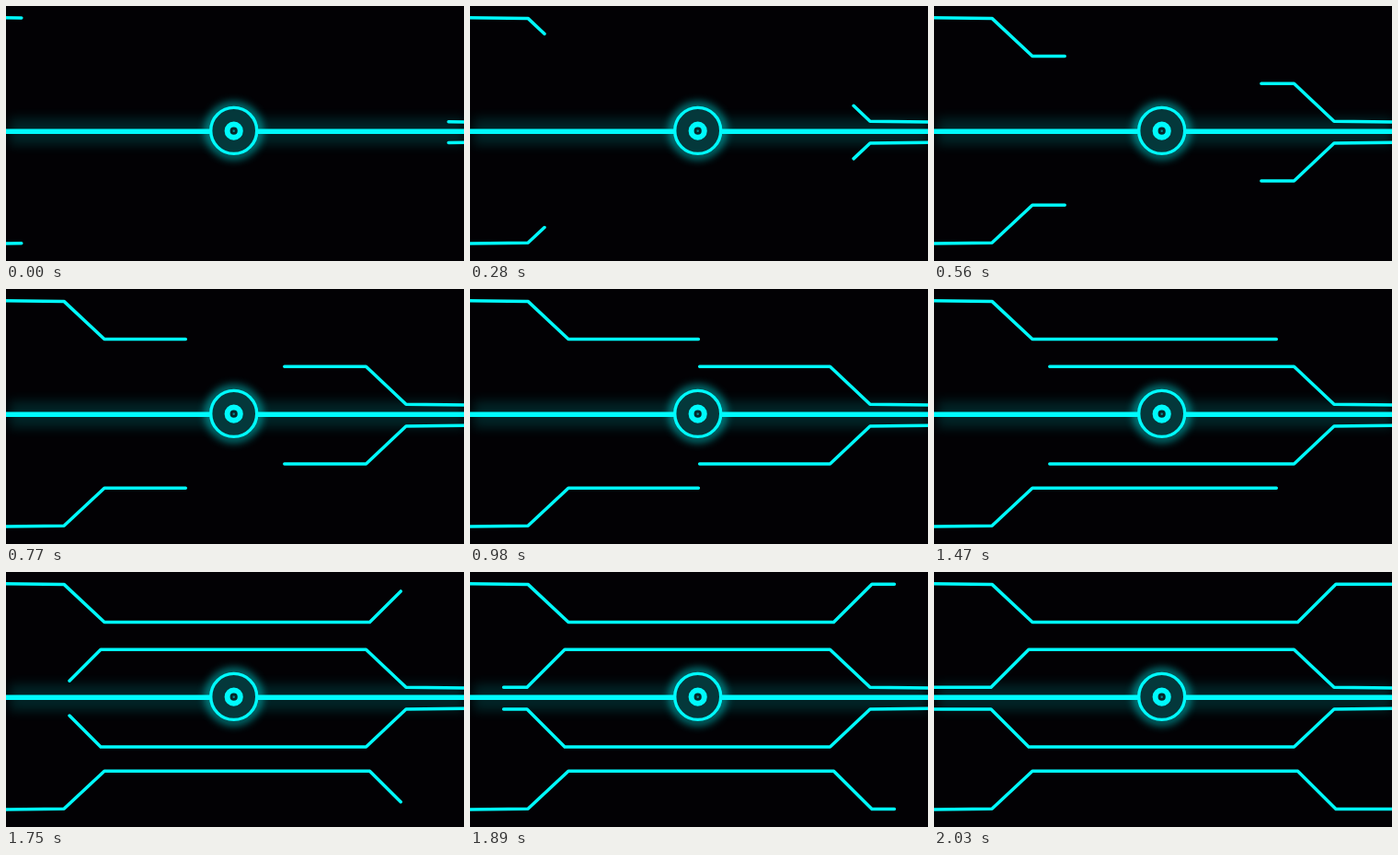
An HTML page that plays this animation: 498 px wide and 277 px high, repeating every 8000 ms.

```html
<!DOCTYPE html>
<html lang="en">
<head>
<meta charset="utf-8">
<title>Neon circuit lines</title>
<style>
  html, body { margin: 0; width: 100%; height: 100%; overflow: hidden; background: #020104; }
  svg { display: block; width: 498px; height: 277px; }
  .trace {
    fill: none;
    stroke: #00fafc;
    stroke-width: 3.5;
    stroke-linecap: round;
    stroke-linejoin: round;
    stroke-dasharray: 600;
    animation: draw 8000ms infinite;
  }
  /* 29 equal steps of 70 ms, then the finished drawing holds */
  @keyframes draw {
    0% { stroke-dashoffset: 582.7; animation-timing-function: steps(29, end); }
    25.375% { stroke-dashoffset: 69.4; animation-timing-function: step-start; }
    25.376%, 100% { stroke-dashoffset: 0; }
  }
</style>
</head>
<body>
<svg viewBox="0 0 498 277">
  <defs>
    <filter id="wide" x="-40" y="80" width="580" height="112" filterUnits="userSpaceOnUse">
      <feGaussianBlur stdDeviation="6"/>
    </filter>
    <filter id="halo" x="190" y="78" width="116" height="116" filterUnits="userSpaceOnUse">
      <feGaussianBlur stdDeviation="5"/>
    </filter>
    <filter id="soft" x="0" y="0" width="498" height="277" filterUnits="userSpaceOnUse">
      <feGaussianBlur stdDeviation="0.45"/>
    </filter>
  </defs>

  <rect x="4" y="122" width="494" height="29" fill="#00e6e6" opacity=".15" filter="url(#wide)"/>
  <circle cx="247.7" cy="135.4" r="27" fill="none" stroke="#00e6e6" stroke-width="8" opacity=".6" filter="url(#halo)"/>

  <g filter="url(#soft)">
    <path class="trace" d="M-.5 12.7L63 13.4L107 54.5H395.5L437 13.2H500"/>
    <path class="trace" d="M-.5 258L63 257.3L107 216.2H395.5L437 257.5H500"/>
    <path class="trace" d="M498.5 126L435 125.2L391.5 84.2H103L62 125.2H-2"/>
    <path class="trace" d="M498.5 148.2L435 149L391.5 190H103L62 149H-2"/>
  </g>

  <path d="M0 136.3H223M272 136.3H498" stroke="#00fafc" stroke-width="5.4"/>
  <circle cx="247.7" cy="135.4" r="25" fill="#04383b" stroke="#00fafc" stroke-width="3.4"/>
  <circle cx="247.7" cy="135.7" r="7.1" fill="#04282b" stroke="#00fafc" stroke-width="6"/>
  <circle cx="247.7" cy="135.7" r="1.2" fill="#078c90"/>
</svg>
</body>
</html>
```
